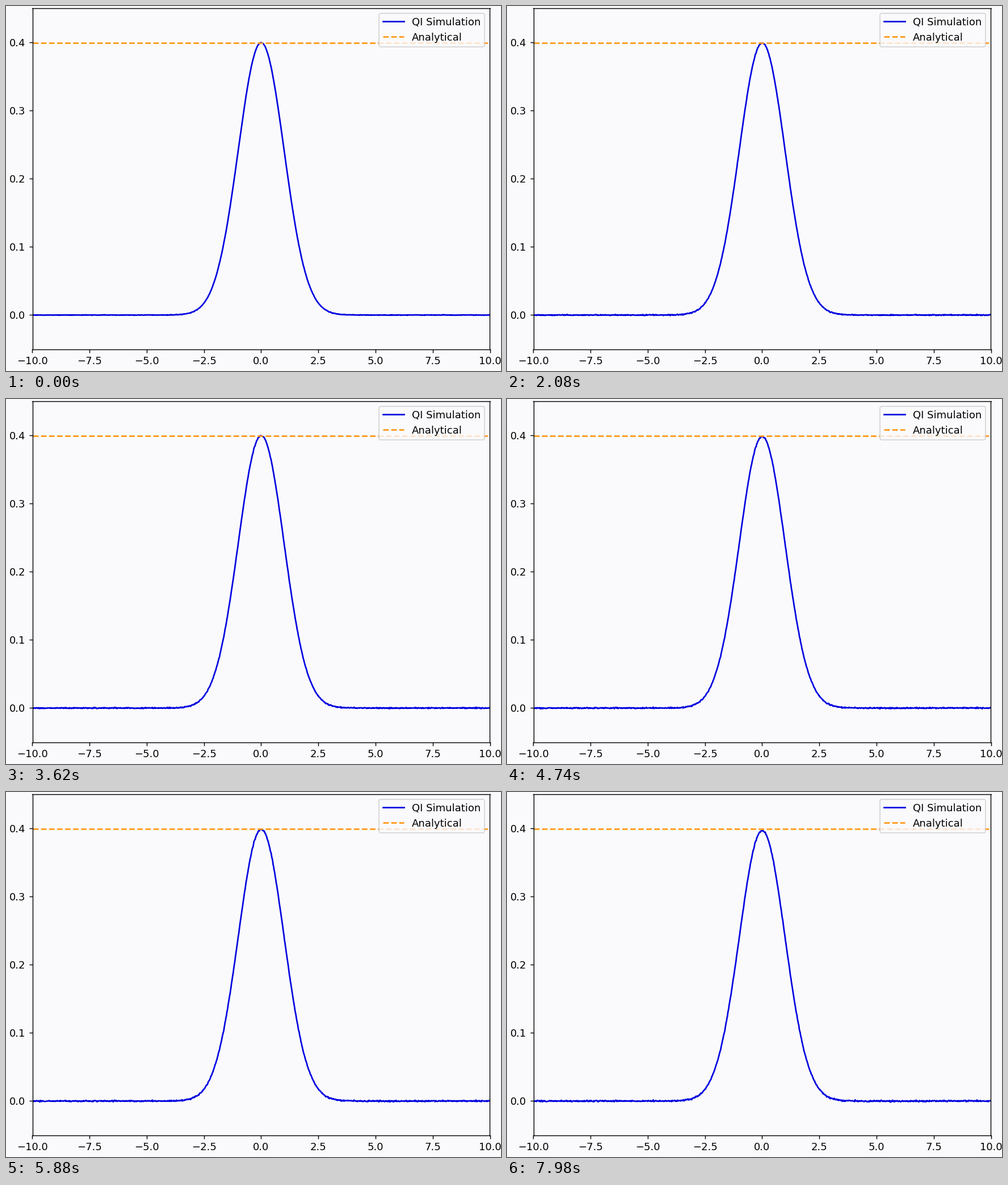
Write a matplotlib script that moves like this. It is 872x643 px and loops after 8 s.

```python
import numpy as np
import matplotlib.pyplot as plt
from matplotlib.animation import FuncAnimation

W, H, DPI = 872, 643, 128
TICK, LOOP = 20, 8000
PAPER, BLUE, ORANGE = "#fafafc", "#0000e0", "#ff9614"
PEAK = 1 / np.sqrt(2 * np.pi)

plt.rcParams.update({
    "font.family": "DejaVu Sans",
    "font.size": 10.16,
    "axes.facecolor": PAPER,
    "figure.facecolor": PAPER,
})


def step_at(ms):
    """Simulation steps come in bursts: two short ones, then a pause."""
    burst, rest = divmod(ms + 20, 140)
    return 3 * burst + min(rest // 20, 2)


# The simulation error builds up as a random walk at every point.
x = np.linspace(-10, 10, 1001)
bell = PEAK * np.exp(-x**2 / 2)
steps = step_at(LOOP) + 1
rng = np.random.default_rng(11)
start = rng.normal(0, 0.00018, x.size)
walk = np.cumsum(rng.normal(0, 0.000042, (steps, x.size)), axis=0)

# Slow drift of the peak height
drift_ms = [0, 2080, 3620, 4740, 5880, 6880, 7980]
drift = [0.0003, -0.0003, 0.0002, -0.0012, -0.0009, 0.0, -0.0028]


def curve(ms):
    n = step_at(ms)
    scale = 1 + np.interp(140 * n / 3, drift_ms, drift) / PEAK
    return bell * scale + start + walk[n]


fig = plt.figure(figsize=(W / DPI, H / DPI), dpi=DPI)
left, right, top, bottom = 46.5, 852.5, 3.5, 604.5
ax = fig.add_axes([left / W, 1 - bottom / H, (right - left) / W, (bottom - top) / H])
ax.set_xlim(-10, 10)
ax.set_ylim(-0.05, 0.45)
ax.set_xticks(np.arange(-10, 10.1, 2.5))
ax.set_yticks(np.arange(0, 0.41, 0.1))

line, = ax.plot(x, curve(0), color=BLUE, lw=1.5, label="QI Simulation")
ax.axhline(PEAK, color=ORANGE, lw=1.5, ls="--", label="Analytical")
ax.legend(loc="upper right")


def update(i):
    line.set_ydata(curve(i * TICK))
    return line,


anim = FuncAnimation(fig, update, frames=LOOP // TICK, interval=TICK,
                     repeat=True, repeat_delay=0, blit=False)
plt.show()
```
